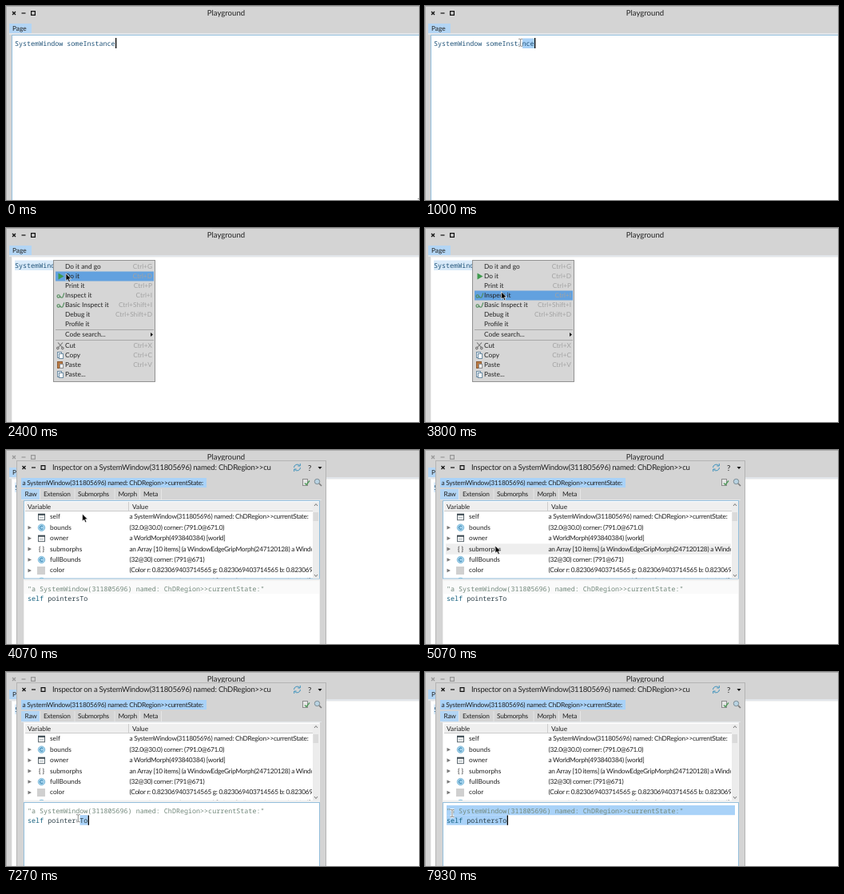
Animation of 517 by 243 pixels, one loop 8 s. Source, as an HTML page:

```html
<!DOCTYPE html>
<html lang="en">
<head>
<meta charset="utf-8">
<title>Playground</title>
<style>
html, body { margin: 0; width: 100%; height: 100%; overflow: hidden; background: #fff; }
svg { display: block; width: 517px; height: 243px; text-rendering: geometricPrecision; }
text { white-space: pre; fill: #222; font: 8.3px Lato, sans-serif; }
.title { font-size: 9.6px; }
.tight { letter-spacing: -.24px; }
.value { letter-spacing: -.28px; }
.code { font: 8.4px "Noto Sans Mono", monospace; fill: #1f5278; }
.key { fill: #a3a3a3; }
.note { fill: #73897c; }
.self { fill: #15617f; }
.send { fill: #2c3f48; }
</style>
</head>
<body>
<svg id="stage" viewBox="0 0 517 243"></svg>
<script>
const NS = 'http://www.w3.org/2000/svg';
const stage = document.getElementById('stage');

function add(parent, tag, attrs, content) {
  const node = document.createElementNS(NS, tag);
  for (const name in attrs) node.setAttribute(name, attrs[name]);
  if (content) node.textContent = content;
  return parent.appendChild(node);
}
const group = (parent, attrs) => add(parent, 'g', attrs);
const rect = (parent, x, y, width, height, fill, stroke = 'none') =>
  add(parent, 'rect', { x, y, width, height, fill, stroke });
const path = (parent, d, stroke, width = 1, fill = 'none') =>
  add(parent, 'path', { d, stroke, 'stroke-width': width, fill });
const label = (parent, x, y, content, cls = '', anchor = 'start') =>
  add(parent, 'text', { x, y, class: cls, 'text-anchor': anchor }, content);
const show = (node, on) => node.setAttribute('display', on ? 'inline' : 'none');
const place = (node, x, y) => node.setAttribute('transform', `translate(${x} ${y})`);
function span(node, x1, x2) {
  node.setAttribute('x', x1);
  node.setAttribute('width', Math.max(0, x2 - x1));
}

function windowButtons(parent, x, y) {
  const g = group(parent, { transform: `translate(${x} ${y})` });
  path(g, 'M-2 -2L2 2M2 -2L-2 2', '#111', 1.3);
  path(g, 'M9.5 0H14.5', '#111', 1.2);
  path(g, 'M21.6 -2.4H26.4V2.4H21.6Z', '#111', 1.2);
  return g;
}

const BLUE = '#a9d2f8', GREY = '#d4d4d4', TAB = '#b3d5f4', CHAR = 5.04;
const border = (node, focus) => node.setAttribute('stroke', focus ? '#94bfdc' : '#f2f2f2');

// Playground window
rect(stage, 0, 0, 517, 243, GREY);
path(stage, 'M0 .5H517M.5 0V243', '#aeaeae');
const mainButtons = windowButtons(stage, 10, 9);
label(stage, 275.5, 12.3, 'Playground', 'title', 'middle');
rect(stage, 4, 22, 28, 12, TAB);
label(stage, 8, 31, 'Page');
rect(stage, 4, 34, 513, 2, '#e2e6ea');
const mainPane = rect(stage, 7.5, 36.5, 520, 220, '#fff', '#fff');
const mainSel = rect(stage, 11, 40.5, 0, 12.5, BLUE);
label(stage, 11, 49.5, 'SystemWindow someInstance', 'code');
const mainCaret = rect(stage, 137, 40, 1.3, 13, '#000');

// Context menu
const ITEMS = [
  [48.5, 'Do it and go', 'Ctrl+G'], [60.5, 'Do it', 'Ctrl+D'], [72.5, 'Print it', 'Ctrl+P'],
  [84.5, 'Inspect it', 'Ctrl+I'], [96.5, 'Basic Inspect it', 'Ctrl+Shift+I'],
  [108.5, 'Debug it', 'Ctrl+Shift+D'], [120.5, 'Profile it'], [133.5, 'Code search...'],
  [147.5, 'Cut', 'Ctrl+X'], [159.5, 'Copy', 'Ctrl+C'], [171.5, 'Paste', 'Ctrl+V'], [183.5, 'Paste...']
];
const menu = group(stage);
rect(menu, 59.5, 40.5, 127, 152, '#d6d6d6', '#929292');
path(menu, 'M62 127.5H185M62 140.5H185', '#a8a8a8');
const menuHover = rect(menu, 62, 54.5, 123, 12, '#62a1df');
for (const [y, name, key] of ITEMS) {
  label(menu, 74, y + 2.8, name);
  if (key) label(menu, 183, y + 2.8, key, 'key', 'end');
}
path(menu, 'M181 131L184 133.5L181 136Z', 'none', 0, '#111');
path(menu, 'M65.5 56.5L72.5 60.5L65.5 64.5Z', 'none', 0, '#3f9a4d');
for (const y of [84.5, 96.5]) {
  path(menu, `M64 ${y + 1}a1.7 1.7 0 1 0 3.4 0a1.7 1.7 0 1 0 -3.4 0M68 ${y + 1}a1.7 1.7 0 1 0 3.4 0l1.4 -4`, '#4d8a58', 1.1);
}
path(menu, 'M65 143.5L70.5 149.5M71 143.5L65.5 149.5', '#777', 1.1);
path(menu, 'M63.5 150.5a1.3 1.3 0 1 0 2.6 0a1.3 1.3 0 1 0 -2.6 0M69.5 150.5a1.3 1.3 0 1 0 2.6 0a1.3 1.3 0 1 0 -2.6 0', '#555', 1);
for (const y of [159.5, 183.5]) {
  rect(menu, 64.5, y - 4, 5, 7, '#e9f1f7', '#6d8ca3');
  rect(menu, 66.5, y - 2, 5, 6, '#fff', '#6d8ca3');
}
rect(menu, 64.5, 167.5, 6, 8, '#b87943', '#8e5c33');
rect(menu, 67.5, 170.5, 4, 5, '#fff', '#8a8a8a');

// Inspector window
const NAME = 'a SystemWindow(311805696) named: ChDRegion>>currentState:';
const insp = group(stage);
rect(insp, 13.5, 13.5, 387, 240, GREY, '#b4b4b4');
windowButtons(insp, 22.5, 22);
label(insp, 58, 25.4, 'Inspector on a SystemWindow(311805696) named: ChDRegion>>cu', 'title tight');
path(insp, 'M360.5 22a4 4 0 0 1 7 -2.5M368.5 22a4 4 0 0 1 -7 2.5M368.3 17V20H365.3M360.7 27V24H363.7', '#3f93bd', 1);
label(insp, 378, 25.6, '?', 'title');
path(insp, 'M390.5 21H395.5L393 24Z', 'none', 0, '#111');
rect(insp, 19, 35, 232, 12, BLUE);
label(insp, 20.5, 44, NAME, 'tight');
rect(insp, 371.5, 36.5, 6, 8, '#e6e6e6', '#8b8b8b');
path(insp, 'M374 41.5L376 43.5L380 38.5', '#4d9a58', 1.3);
add(insp, 'circle', { cx: 389.5, cy: 39.5, r: 3.2, fill: '#b9d3e2', stroke: '#7b8a92' });
path(insp, 'M392 42L395 45', '#7b7b7b', 1.6);

rect(insp, 19, 49, 23, 13, TAB);
[[23.5, 'Raw', 42], [47, 'Extension', 85.5], [90, 'Submorphs', 135.5], [140.5, 'Morph', 167], [172, 'Meta', 194]]
  .forEach(([x, name, end]) => {
    label(insp, x, 58, name, 'tight');
    rect(insp, end, 49, 1, 13, '#e6e6e6');
  });
rect(insp, 19, 62, 376, 1, '#e2e6ea');
rect(insp, 22, 161, 371, 3, '#f0f0f0');

const table = rect(insp, 22.5, 63.5, 370, 97.5, '#fff', '#fff');
rect(insp, 24, 65, 360, 12, '#efefef');
path(insp, 'M24 76.5H384M153.5 65V77', '#cccccc');
label(insp, 27, 73.7, 'Variable');
label(insp, 158, 73.7, 'Value');

const TOP = 77, PITCH = 13.45;
const ROWS = [
  ['self', NAME, 'win'],
  ['bounds', '(32.0@30.0) corner: (791.0@671.0)', 'C'],
  ['owner', 'a WorldMorph(493840384) [world]', 'win'],
  ['submorphs', 'an Array [10 items] (a WindowEdgeGripMorph(247120128) a WindowEdge', '{ }'],
  ['fullBounds', '(32@30) corner: (791@671)', 'C'],
  ['color', '(Color r: 0.823069403714565 g: 0.823069403714565 b: 0.823069403714565', 'box'],
  ['extension', 'a MorphExtension(498270720) [other: (balloonColor -> Color blue)]', 'C']
];
const clip = add(add(insp, 'defs'), 'clipPath', { id: 'list' });
rect(clip, 24, 77, 359, 84, '#000');
const list = group(insp, { 'clip-path': 'url(#list)' });
const rowHover = rect(list, 26, TOP, 357, 13.4, '#eeeeee');
ROWS.forEach(([name, value, icon], i) => {
  const y = TOP + PITCH * (i + .5);
  if (i) path(list, `M27.5 ${y - 2.3}L32 ${y}L27.5 ${y + 2.3}Z`, 'none', 0, '#777');
  if (icon === 'win') {
    rect(list, 40.5, y - 3, 8, 7, '#f2f2f2', '#5f6b72');
    path(list, `M40 ${y - 3}H49`, '#38464e', 2);
    path(list, `M42 ${y + 1}H47`, '#a9b6bd', 1);
  } else if (icon === 'C') {
    add(list, 'circle', { cx: 44.5, cy: y, r: 4.3, fill: '#9fcfea', stroke: '#6fb0d3', 'stroke-width': .7 });
    path(list, `M46 ${y - 1.6}a2.1 2.1 0 1 0 0 3.2`, '#2f7fac', 1);
  } else if (icon === 'box') {
    rect(list, 39, y - 5, 10, 10, '#d0d0d0');
  } else {
    label(list, 44.5, y + 2.5, icon, '', 'middle');
  }
  label(list, 55, y + 2.5, name);
  label(list, 154.5, y + 2.5, value, 'value');
});
rect(insp, 384, 65, 8, 96, '#ececec');
rect(insp, 384.5, 78, 6.5, 11, '#dadada');
path(insp, 'M386 70L388 67.5L390 70M386 156L388 158.5L390 156', '#777');

const pane = rect(insp, 22.5, 163.5, 370, 90, '#fff', '#fff');
const firstLine = rect(insp, 23, 164, 369, 16, '#fafafa');
const sel1 = rect(insp, 27, 167, 0, 12.2, BLUE);
const sel2 = rect(insp, 27, 179.2, 0, 12.5, BLUE);
label(insp, 27, 176.6, `"${NAME}"`, 'code note');
const line = label(insp, 27, 189, '', 'code');
add(line, 'tspan', { class: 'self' }, 'self');
add(line, 'tspan', { class: 'send' }, ' pointersTo');
const caret = rect(insp, 102.7, 179.5, 1.3, 12.3, '#000');

// Pointers: arrow at its tip, the others at their centre
const pointers = {
  arrow: group(stage), beam: group(stage), size: group(stage)
};
path(pointers.arrow, 'M0 0V9.2L2.2 7.3L3.8 10.8L5.4 10L3.9 6.7H6.8Z', '#fff', .7, '#000');
const BEAM = 'M-2.5 -4.5H-.8L0 -4L.8 -4.5H2.5M0 -4V4M-2.5 4.5H-.8L0 4L.8 4.5H2.5';
path(pointers.beam, BEAM, '#fff', 2.6);
path(pointers.beam, BEAM, '#555', .7);
const SIZE = 'M0 -4.5L2.3 -1.8H.6V1.8H2.3L0 4.5L-2.3 1.8H-.6V-1.8H-2.3Z';
path(pointers.size, SIZE, '#fff', 1.4, '#000');
path(pointers.size, SIZE, 'none', 0, '#000');

// Pointer stops: tick, x, y
const TICK = 200 / 3, TICKS = 120;
const STOPS = [
  [0, 518, 246], [11, 147, 50], [13, 147, 50], [20, 9, 29], [22, 9, 29], [28, 62, 45],
  [33, 62, 45], [36, 75, 57], [39, 91, 76], [42, 91, 76], [46, 92, 75], [51, 92, 75],
  [53, 95.5, 80], [67, 95.5, 80], [76, 88, 120], [80, 85, 136], [81, 84, 138], [82, 83, 137],
  [84, 83, 137], [86, 80, 137], [89, 80, 137], [90, 79, 137], [94, 79, 137], [98, 87, 164],
  [103, 107, 185], [105, 107, 185], [118, 33, 177], [119, 34, 177]
];
function pointerAt(k) {
  const i = Math.max(1, STOPS.findIndex(s => s[0] >= k));
  const [k0, x0, y0] = STOPS[i - 1], [k1, x1, y1] = STOPS[i];
  const u = (k - k0) / (k1 - k0), e = u * u * (3 - 2 * u);
  return [x0 + (x1 - x0) * e, y0 + (y1 - y0) * e];
}
const snap = (x, left, end) =>
  Math.min(end, Math.max(left, left + Math.round((x - left) / CHAR) * CHAR));

function render(k) {
  const [x, y] = pointerAt(k);
  const kind = k < 31 || k > 99 ? 'beam' : k > 96 ? 'size' : 'arrow';
  for (const name in pointers) show(pointers[name], name === kind);
  place(pointers[kind], x, y);

  const away = k >= 31;
  border(mainPane, !away);
  mainSel.setAttribute('fill', away ? '#d9eaf9' : BLUE);
  span(mainSel, k < 14 ? 137 : k < 20 ? snap(x, 11, 137) : 11, 137);
  show(mainCaret, !away);

  show(menu, away && k < 59);
  const item = Math.floor((y - 42.5) / 12);
  show(menuHover, k >= 34);
  menuHover.setAttribute('y', 42.5 + 12 * item);

  const open = k >= 61;
  show(insp, open);
  mainButtons.setAttribute('opacity', open ? .3 : 1);
  const row = Math.floor((y - TOP) / PITCH);
  show(rowHover, k >= 68 && kind === 'arrow' && row < 6);
  rowHover.setAttribute('y', TOP + PITCH * row);

  const focus = k >= 106, upper = y < 180;
  border(table, !focus);
  border(pane, focus);
  show(firstLine, !focus);
  show(caret, focus);
  const from = k >= 118 ? 27 : snap(x, 27, 102.7);
  span(sel1, from, focus && upper ? 388 : from);
  span(sel2, upper ? 27 : from, focus ? 102.7 : 0);
}

const start = performance.now();
function frame() {
  const t = performance.now() - start;
  render(Math.floor((t + 4) / TICK) % TICKS);
  requestAnimationFrame(frame);
}
render(0);
requestAnimationFrame(frame);
</script>
</body>
</html>
```
